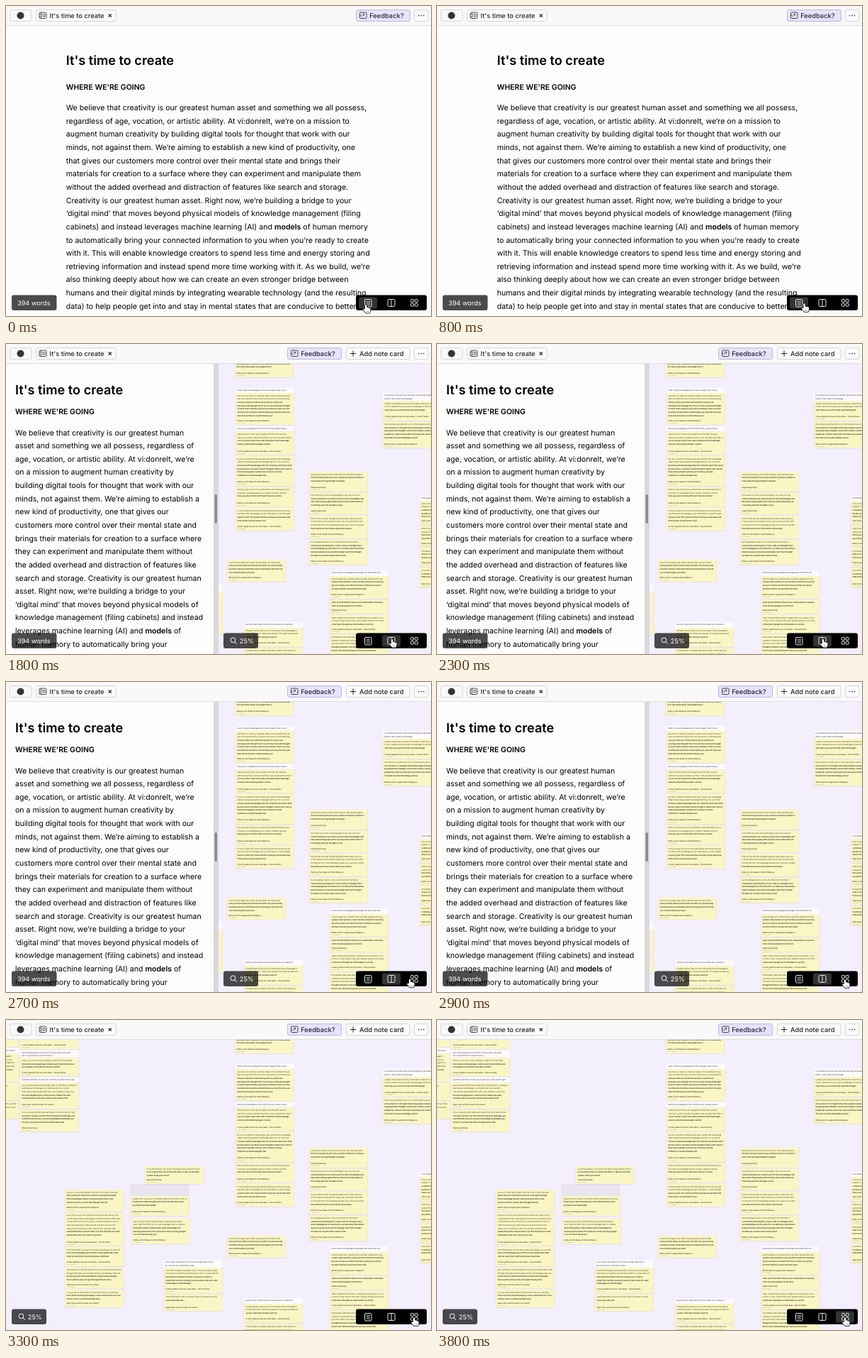
Write an HTML page with a canvas that moves like this. It is 600x437 px and loops after 4.1 s.

```html
<!DOCTYPE html>
<html lang="en">
<head>
<meta charset="utf-8">
<title>It's time to create</title>
<style>
  html, body { margin: 0; width: 100%; height: 100%; overflow: hidden; background: #fdfdfd; }
  canvas { display: block; width: 600px; height: 437px; }
</style>
</head>
<body>
<canvas id="stage"></canvas>
<script>
const W = 600, H = 437, LOOP = 4100, HEAD = 27.5;
const canvas = document.getElementById('stage');
const ctx = canvas.getContext('2d');
const dpr = window.devicePixelRatio || 1;
canvas.width = W * dpr;
canvas.height = H * dpr;

const INK = '#000';

// "|" breaks a line in the wide layout, "~" in the narrow one
const ESSAY = `We believe that creativity is our greatest human~asset and something we all possess,|
regardless of~age, vocation, or artistic ability. At vi:donrelt, we’re~on a mission to|
augment human creativity by~building digital tools for thought that work with our|~
minds, not against them. We’re aiming to establish a~new kind of productivity, one|
that gives our~customers more control over their mental state and~brings their|
materials for creation to a surface where~they can experiment and manipulate them|
without~the added overhead and distraction of features like~search and storage.|
Creativity is our greatest human~asset. Right now, we’re building a bridge to your|~
‘digital mind’ that moves beyond physical models of~knowledge management (filing|
cabinets) and instead~leverages machine learning (AI) and *models* of~human memory|
to automatically bring your~connected information to you when you’re ready to create|
with it. This will enable knowledge creators to spend less time and energy storing and|
retrieving information and instead spend more time working with it. As we build, we’re|
also thinking deeply about how we can create an even stronger bridge between|
humans and their digital minds by integrating wearable technology (and the resulting|
data) to help people get into and stay in mental states that are conducive to better`
  .replace(/\n/g, '');

const wideLines = ESSAY.replace(/~/g, ' ').split(/\s*\|\s*/);
const narrowLines = ESSAY.replace(/\|/g, ' ').split(/\s*~\s*/).slice(0, 17);

// Board columns: left, top, block heights (negative = white heading)
const COLUMNS = [
  [-64, 10, [28, -8, 40, 24, 25]],
  [20, 5, [36, -11, 26, -7, 37, 31]],
  [323, 10, [37]],
  [324, 62, [-7, 45, -8, 33, 42, 28, 32]],
  [532, 69, [-11, 28, 37]],
  [428, 180, [28, 31, 32, 36]],
  [584, 214, [-7, 34, 30, 26, 28]],
  [196, 206, [25]],
  [176, 248, [28]],
  [177, 280, [36]],
  [83, 239, [31, 47, 27, 30, 25]],
  [223, 338, [-11, 36, 24]],
  [312, 304, [31]],
  [457, 319, [-8, 32, 20, 26, 34]],
  [336, 392, [-8, 27, 34]]
];
const CARD_W = 82.5, LINE = 4.66;
const WORDS = ('the mind of and a memory to information that we can is in people idea how their ' +
  'creative learning from thought it with machine knowledge system you more than find ' +
  'when new human state not only work by are connected').split(' ');
const TITLES = [
  'Notes on the Shape of Useful Memory',
  'Minds and the augmented intelligence',
  'Open tools and the search for context',
  'A short guide to how we store ideas - Course Notes',
  'Organising things'
];

function random(seed) {
  return () => (seed = (seed * 16807) % 2147483647) / 2147483647;
}

function font(size, weight = 400) {
  ctx.font = `${weight} ${size}px Inter, "Liberation Sans", sans-serif`;
}

function text(str, x, y, size, weight = 400, color = INK) {
  font(size, weight);
  ctx.fillStyle = color;
  ctx.fillText(str, x, y);
}

function richText(str, x, y, size) {
  str.split('*').forEach((part, i) => {
    text(part, x, y, size, i % 2 ? 600 : 400);
    x += ctx.measureText(part).width;
  });
}

function rect(x, y, w, h, color) {
  ctx.fillStyle = color;
  ctx.fillRect(x, y, w, h);
}

function box(x, y, w, h, r, fill, stroke, width = 1) {
  ctx.beginPath();
  ctx.roundRect(x, y, w, h, r);
  if (fill) { ctx.fillStyle = fill; ctx.fill(); }
  if (stroke) { ctx.strokeStyle = stroke; ctx.lineWidth = width; ctx.stroke(); }
}

function strokes(path, color, width = 1) {
  ctx.strokeStyle = color;
  ctx.lineWidth = width;
  ctx.stroke(new Path2D(path));
}

// ---- document ----

function page(x, top, gap, lines) {
  const sub = top + gap;
  text("It's time to create", x, top, 18.15, 600);
  text("WHERE WE'RE GOING", x, sub, 10.5, 600);
  lines.forEach((line, i) => richText(line, x, sub + 29.6 + i * 18.64, 10.62));
}

// ---- board ----

function phrase(rnd, size, weight, width) {
  font(size, weight);
  let str = '';
  for (;;) {
    const next = str + (str ? ' ' : '') + WORDS[Math.floor(rnd() * WORDS.length)];
    if (ctx.measureText(next).width > width) return str;
    str = next;
  }
}

function heading(x, y, h, rnd) {
  rect(x, y, CARD_W, h, '#fcfaff');
  const count = h > 10 ? 2 : 1;
  for (let i = 0; i < count; i++) {
    const width = i ? 44 : 77;
    text(phrase(rnd, 2.66, 400, width), x + 2, y + 4.2 + i * LINE, 2.66, 400, '#333');
  }
}

function card(x, y, h, rnd) {
  rect(x - 0.4, y, CARD_W + 0.8, h + 0.7, 'rgba(90,80,110,.14)');
  rect(x, y, CARD_W, h, '#faf6c4');
  const count = Math.max(2, Math.round((h - 13) / LINE));
  const boldFrom = Math.floor(count * (0.35 + rnd() * 0.55));
  for (let i = 0; i < count; i++) {
    const weight = i >= boldFrom ? 700 : 400;
    const width = i === count - 1 ? 28 + rnd() * 42 : 77;
    text(phrase(rnd, 2.66, weight, width), x + 2.5, y + 4.6 + i * LINE, 2.66, weight, '#34332a');
  }
  const title = TITLES[Math.floor(rnd() * TITLES.length)];
  text(title, x + 2.5, y + h - 5, 2.5, 600, '#3c3b32');
  text('notes.example', x + 2.5, y + h - 1.7, 1.7, 400, '#9a9780');
}

function board(left) {
  ctx.save();
  ctx.beginPath();
  ctx.rect(left, HEAD, W - left, H - HEAD);
  ctx.clip();
  rect(left, HEAD, W - left, H, '#f4effc');
  rect(175.5, 231, 83, 17, '#e9e4f0');
  COLUMNS.forEach(([x, top, blocks], i) => {
    const rnd = random(977 * (i + 3));
    let y = top;
    for (const b of blocks) {
      if (b < 0) heading(x, y, -b, rnd);
      else card(x, y, b, rnd);
      y += b < 0 ? -b : b + 1.5;
    }
  });
  ctx.restore();
}

// ---- chrome ----

function header(split) {
  const edge = '#d6d6d9';
  rect(0, 0, W, HEAD, '#f9f9fa');
  rect(0, 27, W, 1, '#dededf');

  box(5.5, 5.5, 30.5, 16, 2.5, '#f8f8f9', edge);
  ctx.beginPath();
  ctx.arc(20.5, 13.5, 5, 0, Math.PI * 2);
  ctx.fillStyle = '#333';
  ctx.fill();

  box(42.5, 5.5, 112.5, 16, 2.5, '#fbfbfc', edge);
  box(47, 9, 10, 8.5, 1.5, null, '#333', 0.9);
  strokes('M47 11.4h2.4M47 15h2.4M49.7 9v8.5M52 11.5h3v3.4h-3z', '#333', 0.8);
  text("It's time to create", 61.5, 16.8, 9.28, 500, '#222');
  strokes('M144.8 11.5l4 4m0-4l-4 4', '#222', 1.1);

  const x = split ? 397.5 : 494.5;
  box(x, 5.5, 76, 16, 2.5, '#e7e3fb', '#bdb6e4');
  box(x + 5, 9, 9.5, 8.5, 1.2, null, '#333', 0.9);
  strokes(`M${x + 7} 15.3l4-4m-2.3 0h2.3v2.3M${x + 5} 13.2h2.2`, '#333', 0.8);
  text('Feedback?', x + 18.7, 16.8, 9.3, 500, '#26243a');

  if (split) {
    box(480.5, 5.5, 89.5, 16, 2.5, '#fbfbfc', edge);
    strokes('M486 13.5h8m-4-4v8', '#222', 1);
    text('Add note card', 499, 16.8, 9.28, 500, '#222');
  }

  box(576.5, 5.5, 19.5, 16, 2.5, '#fbfbfc', edge);
  for (let i = -1; i < 2; i++) rect(585.6 + i * 3.4, 12.8, 1.4, 1.4, '#333');
}

function pill(x, w, color = 'rgba(0,0,0,.7)') {
  box(x, 407.5, w, 21.5, 3, color);
}

function wordCount() {
  pill(8, 63.5);
  text('394 words', 16, 421.8, 9.2, 400, '#fff');
}

function zoom(x) {
  pill(x, 49);
  ctx.beginPath();
  ctx.arc(x + 13.4, 417.4, 3.4, 0, Math.PI * 2);
  ctx.strokeStyle = '#fff';
  ctx.lineWidth = 1;
  ctx.stroke();
  strokes(`M${x + 15.9} 419.9l3 3`, '#fff', 1);
  text('25%', x + 22.8, 421.8, 9.2, 400, '#fff');
}

function toolbar(active, alpha) {
  pill(494, 100, '#000');
  ctx.globalAlpha = alpha;
  box([498, 531, 563][active], 410.5, 26, 16, 2.5, '#333');
  ctx.globalAlpha = 1;
  const c = '#e8e8e8';
  box(506.5, 413.5, 9.5, 10.5, 1.5, null, c);
  strokes('M508.5 416.3h5.5m-5.5 2.4h5.5m-5.5 2.4h5.5', c, 0.9);
  box(539, 413.5, 10, 10, 1.5, null, c);
  strokes('M544 413.5v10', c);
  for (const x of [571.5, 577.3])
    for (const y of [413.5, 419.3]) box(x, y, 4, 4, 0.8, null, c);
}

const HAND = new Path2D('M-1.3 6.6V.8a1.3 1.3 0 0 1 2.6 0V4.2a1.2 1.2 0 0 1 2.2.4' +
  'a1.2 1.2 0 0 1 2 .5a1 1 0 0 1 1.6.9V8.4L5.8 12.2H.4L-3.9 7.8a1.2 1.2 0 0 1 1.7-1.6z');

function hand([x, y]) {
  ctx.save();
  ctx.translate(x, y);
  ctx.scale(0.92, 0.92);
  ctx.lineJoin = 'round';
  ctx.strokeStyle = '#000';
  ctx.lineWidth = 1.6;
  ctx.stroke(HAND);
  ctx.fillStyle = '#fff';
  ctx.fill(HAND);
  strokes('M1.9 8.6v2.2M3.7 8.6v2.2', '#555', 0.6);
  ctx.restore();
}

// ---- timing ----

const STOPS = [[508, 421.5], [545, 416.5], [576, 420]];

function glide(t, start, steps, from, to) {
  const p = Math.min(1, Math.max(0, (Math.floor((t - start) / 100) + 1) / steps));
  const e = 1 - (1 - p) ** 1.5;
  return from.map((v, i) => v + (to[i] - v) * e);
}

function pointer(t) {
  return t < 1800
    ? glide(t, 800, 5, STOPS[0], STOPS[1])
    : glide(t, 2400, 6, STOPS[1], STOPS[2]);
}

function draw(t) {
  const view = t < 1800 ? 0 : t < 3300 ? 1 : 2;
  ctx.setTransform(dpr, 0, 0, dpr, 0, 0);
  ctx.textRendering = 'geometricPrecision';
  rect(0, 0, W, H, '#fdfdfd');

  if (view === 0) {
    page(84.7, 82.5, 35, wideLines);
  } else if (view === 1) {
    page(13, 70.5, 28.4, narrowLines);
    rect(293, HEAD, 7, H, '#d9d8dc');
    box(294.5, 212, 3.5, 41, 1.7, '#8b8a90');
    board(300);
  } else {
    board(0);
  }

  header(view > 0);
  if (view < 2) wordCount();
  if (view > 0) zoom(view === 1 ? 307 : 8);
  toolbar(view, view === 2 ? Math.min(1, Math.max(0, (t - 3300) / 300)) : 1);
  hand(pointer(t));
}

let last = -1;
const begin = performance.now();

function tick() {
  const t = Math.floor(((performance.now() - begin) % LOOP) / 100) * 100;
  if (t !== last) draw(last = t);
  requestAnimationFrame(tick);
}
tick();
</script>
</body>
</html>
```
